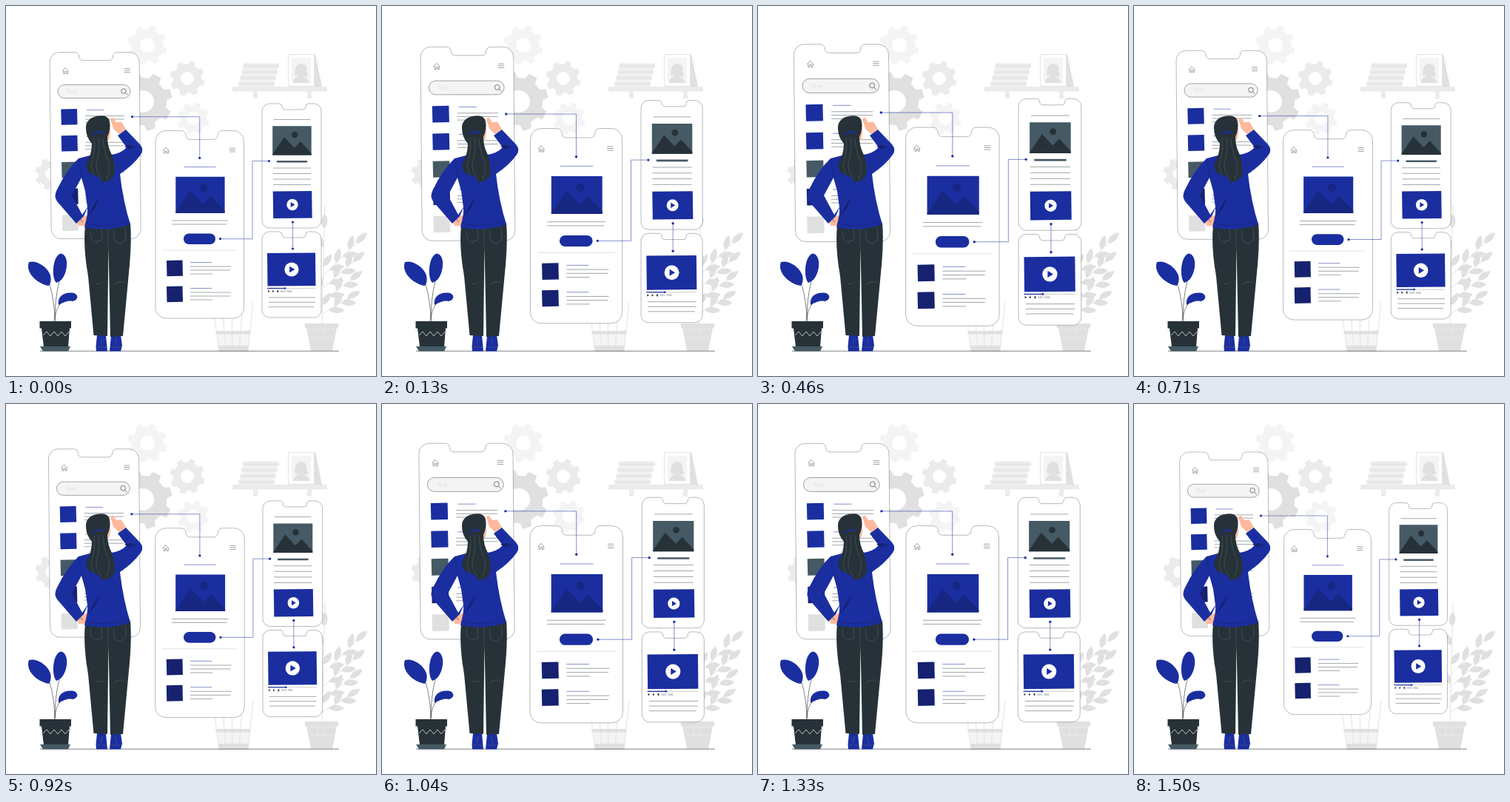
An HTML page for the animation above (1540 ms loop, 500 by 500 pixels).

```html
<!DOCTYPE html>
<html lang="en">
<head>
<meta charset="utf-8">
<style>
html, body { margin: 0; width: 100%; height: 100%; overflow: hidden; background: #fff; }
svg { display: block; width: 100%; height: 100%; }
.ink { fill: none; stroke: #263238; stroke-width: .6; }
.thin { fill: none; stroke: #263238; stroke-width: .6; opacity: .7; }
.link { fill: none; stroke: #1a2ea0; stroke-width: .6; opacity: .85; }
.case { fill: #fff; stroke: #263238; stroke-width: .6; stroke-opacity: .55; }
.seam { fill: none; stroke: #59666c; stroke-width: .5; }
.pale { fill: none; stroke: #e0e0e0; stroke-width: .9; }
.blue { fill: #1a2ea0; }
.shade { fill: #162782; }
.navy { fill: #16226f; }
.dark { fill: #263238; }
.slate { fill: #455a64; }
.skin { fill: #ffb99b; }
.g1 { fill: #f4f4f4; }
.g2 { fill: #ebebeb; }
.g3 { fill: #e0e0e0; }
.white { fill: #fff; }
</style>
</head>
<body>
<svg viewBox="0 0 500 500">
  <g id="gears" fill-rule="evenodd"></g>

  <g id="shelf">
    <path class="g2" d="M306 109H434V115.500H306zM334 115H340V125H334zM407 115H413V125H407z"/>
    <path class="g3" d="M411 65H418L427 109H411z"/>
    <path fill="#fff" stroke="#e3e3e3" d="M381.500 65.500H416.500V108.500H381.500z"/>
    <path class="g1" d="M386 70H412V104H386z"/>
    <path class="g3" d="M390 93Q390 78 399 78Q407 79 406 86L408 95L396 96zM388 104Q389 95 399 95Q408 96 410 104z"/>
  </g>

  <g id="fern"></g>
  <path class="g3" d="M404 429H449V435H447L441 466H412L406 435H404z"/>
  <path fill="none" stroke="#ececec" stroke-width=".8" d="M408 437H446M411 448H443M421 438V448M431 438V448"/>

  <g id="basket">
    <path class="g1" d="M285 443H330L327 466H288z"/>
    <path class="pale" d="M279 400L288 466M334 400L327 466M292 400L297 466M305 400L306 466M320 400L315 466"/>
    <path class="g3" d="M283 439H331L330 443.500H284zM287 459H328L327 467H288z"/>
  </g>

  <g id="screens">
    <g id="cases"></g>

    <g id="results">
      <rect x="70" y="106.500" width="98" height="18" rx="9" fill="#f4f4f4" stroke="#263238" stroke-opacity=".7" stroke-width=".6"/>
      <text x="82" y="118" font-family="Lato, sans-serif" font-size="7.500" fill="#e0e0e0">Text</text>
      <path class="ink" d="M161.500 117.500L164.500 120.500"/>
      <circle class="ink" cx="159" cy="115" r="3.300"/>
    </g>

    <g id="article">
      <rect class="blue" x="240" y="307.500" width="43" height="14.500" rx="7.200"/>
      <path stroke="#d5d5d5" stroke-width=".7" d="M211 330H312"/>
    </g>

    <g id="player">
      <path class="slate" d="M366 209H407V211.500H366z"/>
      <path stroke="#c4c4c4" stroke-width=".8" d="M353 381.500H418"/>
      <path stroke="#1a2ea0" stroke-width="1.200" d="M353 381.500H377"/>
      <circle class="blue" cx="377" cy="381.500" r="1.300"/>
      <path class="dark" d="M354 384L356.500 385.500L354 387zM360 384L362.500 385.500L360 387zM366 385L368 383.500V387.500L366 386z"/>
      <text x="371" y="387" font-family="Lato, sans-serif" font-size="3" fill="#455a64">0:21 / 0:54</text>
    </g>

    <g id="links"></g>
  </g>

  <path class="ink" d="M46 466.300H450"/>

  <g id="houseplant">
    <path class="ink" d="M66 427Q66 400 59 376M66 427Q66 395 72 372M66 424Q67 408 76 399"/>
    <path class="blue" d="M31 346C41 343 56 352 60 364Q62 373 58 378C46 377 25 362 31 346zM74 334.500C83 336 84 350 80 361Q76 372 68 374C61 367 63 337 74 334.500zM71 404C69 390 82 386 92 388C99 391 97 398 90 399Q84 397 71 404z"/>
    <path class="dark" d="M45.500 426H88V435.500H86L84 461H51L48 435.500H45.500z"/>
    <path class="slate" d="M46 460H87L84 466.500H50z"/>
    <path fill="none" stroke="#fff" stroke-width=".7" d="M50 445l5-5l5 6l5-6l5 6l5-6l5 6l5-6"/>
  </g>

  <g id="woman">
    <path class="blue" d="M123 445H135L137 466.500H122L121.500 460zM142 446L155 445L157 459L155 466.500H140z"/>
    <path class="seam" d="M123 461H136M142 461H156M130 449L128 459M148 449L150 459"/>
    <path class="dark" d="M107 297L168 293Q170 315 167 350L158 446L141 447L138.500 326L137 446L118.500 445L111 365Q104 325 107 297z"/>
    <path class="seam" d="M138 300V326M114 303Q113 318 121 319L130 316L129 302M145 302L147 318L155 321L162 315L161 299M121 374Q126 378 131 373M146 376Q153 371 160 374"/>
    <path class="skin" d="M96 289L104 283L117 284L113 288L116 290L106 297L98 297zM141 152L144.500 150.500L149 157L156 156.500L162 167L153 173L145 166z"/>
    <path class="skin" d="M137 159Q144 166 139 181L132 183z"/>
    <path class="blue" fill-rule="evenodd" d="M98 206L117 201H142Q156 199 163 191L151 175L162 167L181 187Q187 194 182 201Q172 215 154 227Q158 263 168 295Q137 306 106 299Q111 280 110 273L105 284L95 294L69 264Q64 257 69 248Q82 221 98 206zM102 232L89 256L103 282L110 272L107 250z"/>
    <path class="navy" d="M126 258Q122 274 111 284Q119 268 126 258zM160 190Q168 186 175 191L166 193z"/>
    <path fill="none" stroke="#16226f" stroke-width=".6" d="M98 207Q101 222 104 234M154 227L150 207M107 294Q137 301 166 291M96 284L104 292"/>
    <path class="dark" d="M108 165C108 153 118 149 126 148.500Q138 147 140 156Q142 166 137 177Q137 190 143 201C146 210 148 222 146 229Q141 238 130 238Q126 229 117 228Q107 224 109 212Q116 200 116 186Q108 177 108 165z"/>
    <path fill="none" stroke="#1a2ea0" stroke-width="2" d="M117 175Q123 167 133 172"/>
    <path class="seam" d="M119 178Q121 195 116 212Q114 220 119 227M125 177Q128 196 122 212Q120 222 130 234M131 178Q132 196 138 208Q142 221 136 234"/>
  </g>
</svg>

<script>
const LOOP = 1540, STEPS = 37;
const get = id => document.getElementById(id);
const add = (id, markup) => get(id).insertAdjacentHTML("beforeend", markup);
const path = (id, style, d) => add(id, `<path class="${style}" d="${d}"/>`);
const dot = (id, style, x, y, r) => add(id, `<circle class="${style}" cx="${x}" cy="${y}" r="${r}"/>`);

function gear(cx, cy, r, hole, style, turn = .3) {
  const teeth = 8;
  let d = "";
  for (let i = 0; i < teeth * 4; i++) {
    const a = (Math.floor(i / 4) + [-.3, -.19, .19, .3][i % 4]) / teeth * 2 * Math.PI + turn;
    const k = i % 4 % 3 ? r : r * .81;
    d += `${i ? "L" : "M"}${cx + k * Math.cos(a)} ${cy + k * Math.sin(a)}`;
  }
  path("gears", style, `${d}zM${cx - hole} ${cy}a${hole} ${hole} 0 1 0 ${2 * hole} 0a${hole} ${hole} 0 1 0 ${-2 * hole} 0z`);
}

function phone(x0, y0, x1, y1, r, n0, n1, depth, skew = 0) {
  const arc = (x, y, sweep = 1) => `a${Math.abs(x)} ${Math.abs(x)} 0 0 ${sweep} ${x} ${y}`;
  const c = depth / 2;
  add("cases", `<path class="case" transform="skewX(${skew})"
    d="M${x0} ${y0 + r}${arc(r, -r)}H${n0 - c}${arc(c, c)}${arc(c, c, 0)}H${n1 - c}${arc(c, -c, 0)}${arc(c, -c)}
    H${x1 - r}${arc(r, r)}V${y1 - r}${arc(-r, r)}H${x0 + r}${arc(-r, -r)}z"/>`);
}

// Text rows of the given widths, one below the other
function rows(id, style, x, y, gap, ...widths) {
  path(id, style, widths.map((w, i) => `M${x} ${y + i * gap}h${w}`).join(""));
}

// Slightly sheared box
const tile = (id, style, x, y, w, h) => path(id, style, `M${x} ${y}l${w}-.5l.5 ${h}l${-w} .5z`);

function picture(id, base, hills, x, y, w, h) {
  const at = (u, v) => `${x + u * w} ${y + v * h}`;
  path(id, base, `M${at(0, 0)}L${at(1, 0)}V${y + h}H${x}z`);
  path(id, hills, `M${at(0, .97)}L${at(.3, .38)}L${at(.56, .75)}L${at(.72, .53)}L${at(1, .94)}V${y + h}H${x}z`);
  dot(id, hills, x + .57 * w, y + .3 * h, w * .08);
}

function video(x, y, w, h, r, cx, cy) {
  tile("player", "blue", x, y, w, h);
  dot("player", "white", cx, cy, r);
  path("player", "blue", `M${cx - r * .3} ${cy - r * .45}l${r * .75} ${r * .45}l${-r * .75} ${r * .45}z`);
}

function header(id, x, y, menu) {
  path(id, "thin", `M${x - 4} ${y}l4-4.500l4.500 5M${x - 2.500} ${y - 1}v4.500h2v-3h2v3h2v-4`);
  rows(id, "thin", menu, y - 3.500, 2.500, 8, 8, 8);
}

// Leaves alternate along a straight twig
function twig(x0, y0, x1, y1, count, size) {
  path("fern", "pale", `M${x0} ${y0}L${x1} ${y1}`);
  const lean = Math.atan2(y1 - y0, x1 - x0) * 180 / Math.PI;
  for (let i = 1; i <= count; i++) {
    const k = i / count, side = i == count ? 0 : i % 2 ? 32 : -32;
    add("fern", `<path class="g3" d="M0 0Q${size * .4}-9 ${size} 0Q${size * .5} 8 0 0"
      transform="translate(${x0 + (x1 - x0) * k * .8} ${y0 + (y1 - y0) * k * .8}) rotate(${lean + side})"/>`);
  }
}

gear(191, 53, 27, 10, "g1");
gear(245, 98, 24, 9, "g2");
gear(185, 129, 40, 15, "g3", .5);
gear(253, 152, 22, 9, "g1");
gear(61, 227, 22, 8, "g2");

for (let i = 0; i < 4; i++) {
  const x = 320 - i % 2 * 2 - (i > 1) * 4, y = 77.5 + i * 8;
  add("shelf", `<rect class="g2" x="${x}" y="${y}" width="49" height="7.300" rx="3"/>`);
  rows("shelf", "pale", x + 2, y + 4, 0, 45);
}

twig(427, 430, 431, 268, 5, 20);
for (let i = 0; i < 4; i++) twig(428, 365 + i * 17, 484 - i * 5, 310 + i * 27, 5 - (i > 1), 21);

phone(58.5, 62.5, 179.5, 314.5, 13, 98, 144, 11, .5);
phone(202, 168.5, 321.5, 422, 14, 243, 286, 12);
for (const [y0, y1] of [[132, 300], [305, 421]]) phone(346, y0, 426, y1, 10, 373, 405, 8);

header("results", 80, 88, 160);
["blue", "blue", "slate", "navy", "g3"].forEach((style, i) => {
  const y = 139.5 + i * 35.8;
  tile("results", style, 74.3 + i * .4, y, 21.7, 21.3);
  if (i == 4) return;
  rows("results", "link", 109, y + 1, 0, 23);
  rows("results", "thin", 107, y + 9, 4.5, 53, 53, 33);
});

header("article", 216, 195.5, 302);
rows("article", "link", 240.5, 217.5, 0, 43);
picture("article", "blue", "shade", 229.3, 230.7, 66.3, 49);
rows("article", "thin", 224, 290, 5, 76, 74);
for (const y of [344, 379]) {
  tile("article", "navy", 217, y, 21.5, 21.3);
  rows("article", "link", 249, y + 2.5, 0, 29);
  rows("article", "thin", 249, y + 8, 5, 55, 54, 30);
}

rows("player", "thin", 362, 153.5, 0, 49);
picture("player", "slate", "dark", 360.2, 162.2, 52.5, 39.3);
rows("player", "thin", 361, 219, 7.5, 51, 51, 51, 51);
video(360.7, 250.5, 52.5, 36.5, 7.7, 387, 268.5);
video(353, 334, 65, 44.5, 9.6, 386, 356);
rows("player", "thin", 355, 394, 6.3, 63, 63, 61);

// Connectors with a dot at both ends
for (const route of [
  [[170.5, 149.7], [261.7, 149.7], [261.7, 205.3]],
  [[289.5, 314.7], [333, 314.7], [333, 209.5], [355.5, 209.5]],
  [[387.5, 292], [387.5, 328]]
]) {
  path("links", "link", "M" + route.join("L"));
  for (const [x, y] of [route[0], route.at(-1)]) dot("links", "blue", x, y, 1.6);
}

// Times of alternating low and high points
const turns = [-45, 290, 845, 1160, 1500, 1835];
const LOW = .986, HIGH = 1.09;

function scaleAt(t) {
  const i = turns.findIndex(turn => turn > t);
  const k = (t - turns[i - 1]) / (turns[i] - turns[i - 1]);
  return LOW + (HIGH - LOW) * (i % 2 ? k : 1 - k);
}

const screens = get("screens");
function draw() {
  const step = Math.floor(performance.now() % LOOP / LOOP * STEPS);
  screens.setAttribute("transform", `translate(242 246) scale(${scaleAt(step * LOOP / STEPS)}) translate(-242 -246)`);
  requestAnimationFrame(draw);
}
draw();
</script>
</body>
</html>
```
